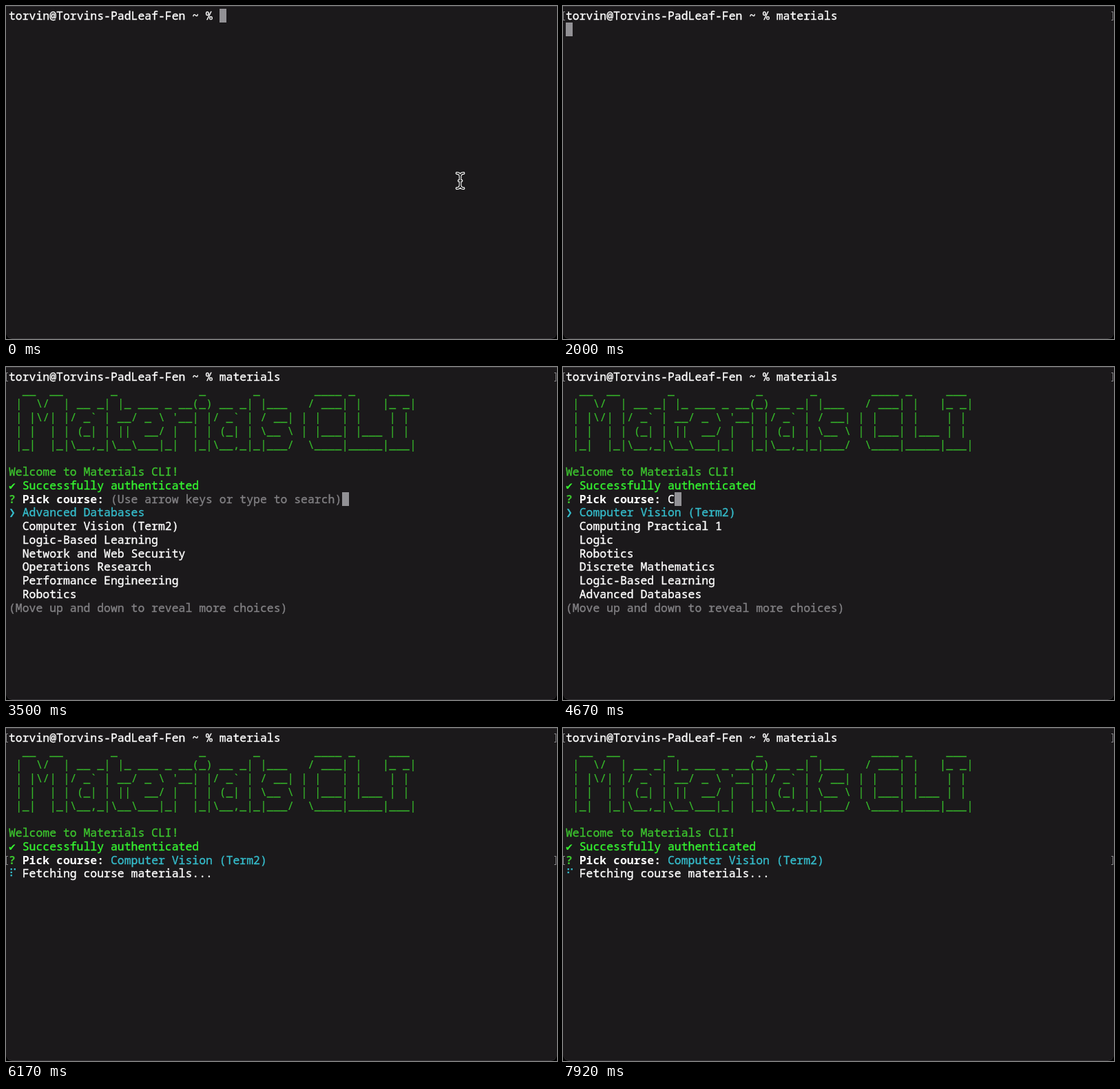
Animation, 800 px wide and 484 px high, one loop 8000 ms. Source, as an HTML page:

```html
<!DOCTYPE html>
<html lang="en">
<head>
<meta charset="utf-8">
<title>Materials CLI</title>
<style>
  html, body { margin: 0; width: 100%; height: 100%; overflow: hidden; background: #000; }
  #term {
    position: relative; width: 800px; height: 484px; overflow: hidden;
    box-sizing: border-box; background: #1b191b; border-radius: 0 0 9px 9px;
    font: 500 16.45px/19.76px "Noto Sans Mono", "DejaVu Sans Mono", monospace;
    font-variant-ligatures: none; color: #fff; white-space: pre;
    -webkit-text-stroke: .35px currentColor;
  }
  #edge {
    position: absolute; inset: 0; border: solid #343235; border-width: 1px 0;
    border-radius: 0 0 9px 9px;
  }
  .row, #banner { position: absolute; left: 4px; margin: 0; font: inherit; }
  #banner { top: 23.56px; color: #37b92b; -webkit-text-stroke-width: .15px; }
  #cursor { position: absolute; width: 10px; height: 20px; background: #929195; }
  .mark {
    position: absolute; width: 3px; height: 13px; box-sizing: border-box;
    border: 1px solid #858487;
  }
  .mark.l { left: 0; border-right: 0; }
  .mark.r { right: 1px; border-left: 0; }
  .sym {
    display: inline-block; width: .6em; line-height: 0;
    font-family: "DejaVu Sans Mono", "DejaVu Sans", monospace;
    -webkit-text-stroke-width: 0;
  }
  .green { color: #3cc42e; }
  .bright { color: #35f430; }
  .cyan { color: #35bccb; }
  .gray { color: #828184; }
  b { font-weight: 700; -webkit-text-stroke-width: 0; }
  svg { position: absolute; left: 0; top: 0; fill: none; stroke-linecap: round; }
</style>
</head>
<body>
<div id="term"><div id="edge"></div><div id="cursor"></div><pre id="banner">
  __  __       _            _       _        ____ _     ___ 
 |  \/  | __ _| |_ ___ _ __(_) __ _| |___   / ___| |   |_ _|
 | |\/| |/ _` | __/ _ \ '__| |/ _` | / __| | |   | |    | | 
 | |  | | (_| | ||  __/ |  | | (_| | \__ \ | |___| |___ | | 
 |_|  |_|\__,_|\__\___|_|  |_|\__,_|_|___/  \____|_____|___|</pre><div id="text"></div><svg id="beam" width="800" height="484"><defs><path id="ibeam" d="M654.5 243Q659.5 243 659.5 248V260Q659.5 265 654.5 265M664.5 243Q659.5 243 659.5 248M659.5 260Q659.5 265 664.5 265M657.5 254H661.5"/></defs><use href="#ibeam" stroke="#fff" stroke-width="3.8"/><use href="#ibeam" stroke="#111" stroke-width="1.5"/></svg></div>
<script>
const LOOP = 8000, TICK = 1000 / 12, CELL = 9.87, LINE = 19.76;
const PROMPT = 'torvin@Torvins-PadLeaf-Fen ~ % ';
const COMMAND = 'materials';
const KEYS = [670, 750, 920, 1000, 1170, 1250, 1500, 1580, 1670];
const QUERY = 'Comp';
const QUERY_KEYS = [4500, 4750, 4920, 5080];
const RUN = 2000, BANNER = 2500, SIGNED_IN = 3250, LIST = 3330, PICK = 5330, FETCH = 5417;
const SPIN = '⠋⠙⠹⠸⠼⠴⠦⠧⠇⠏';

const vision = 'Computer Vision (Term2)', practical = 'Computing Practical 1';
const matches = [vision, practical, 'Operations Research'];
const choices = [
  ['Advanced Databases', vision, 'Logic-Based Learning', 'Network and Web Security',
    'Operations Research', 'Performance Engineering', 'Robotics'],
  [vision, practical, 'Logic', 'Robotics', 'Discrete Mathematics',
    'Logic-Based Learning', 'Advanced Databases'],
  [vision, practical, 'Logic', 'Robotics', 'Operations Research',
    'Discrete Mathematics', 'Logic-Based Learning'],
  matches, matches
];

const el = id => document.getElementById(id);
const span = (cls, s) => `<span class="${cls}">${s}</span>`;
const sym = (cls, s) => span('sym ' + cls, s);
const pressed = (keys, t) => keys.filter(k => t >= k).length;

function spinner(t, start, label) {
  const i = Math.floor((t - start + 4) / TICK) % SPIN.length;
  return sym('cyan', SPIN[i]) + ' ' + label;
}

// Returns the text rows, the cursor cell and the rows with prompt marks.
function screen(t) {
  const rows = [], marks = [];
  const typed = pressed(KEYS, t);
  let cursor = [PROMPT.length + typed, 0];
  rows[0] = PROMPT + COMMAND.slice(0, typed);
  if (t >= RUN) {
    marks.push(0);
    cursor = [0, 1];
  }
  if (t >= BANNER) {
    rows[7] = span('green', 'Welcome to Materials CLI!');
    rows[8] = spinner(t, BANNER, 'Authenticating...');
    cursor = null;
  }
  if (t >= SIGNED_IN) {
    rows[8] = sym('bright', '✔') + span('bright', ' Successfully authenticated');
    cursor = [0, 9];
  }
  if (t >= LIST) {
    const ask = '<b>' + span('green', '?') + ' Pick course:</b> ';
    if (t >= PICK) marks.push(9);
    if (t >= FETCH) {
      rows[9] = ask + span('cyan', vision);
      rows[10] = spinner(t, FETCH, 'Fetching course materials...');
      cursor = null;
    } else {
      const n = pressed(QUERY_KEYS, t);
      const hint = '(Use arrow keys or type to search)';
      rows[9] = ask + (n ? QUERY.slice(0, n) : span('gray', hint));
      cursor = [15 + (n || hint.length), 9];
      choices[n].forEach((name, i) => {
        rows[10 + i] = i ? '  ' + name : sym('cyan', '❯') + span('cyan', ' ' + name);
      });
      if (choices[n].length > 6) {
        rows[17] = span('gray', '(Move up and down to reveal more choices)');
      }
    }
  }
  return { rows, cursor, marks };
}

let shown = '';
function draw(t) {
  const { rows, cursor, marks } = screen(t);
  let html = '';
  rows.forEach((s, i) => {
    html += `<div class="row" style="top:${(3.8 + i * LINE).toFixed(2)}px">${s}</div>`;
  });
  for (const m of marks) {
    const top = Math.round(8 + m * LINE);
    for (const side of 'lr') html += `<div class="mark ${side}" style="top:${top}px"></div>`;
  }
  if (html !== shown) el('text').innerHTML = shown = html;

  el('banner').hidden = t < BANNER;
  el('beam').style.display = t < KEYS[0] ? '' : 'none';
  const block = el('cursor');
  block.hidden = !cursor;
  if (cursor) {
    block.style.left = Math.round(4 + cursor[0] * CELL) + 'px';
    block.style.top = Math.round(4.2 + cursor[1] * LINE) + 'px';
  }
}

const begin = performance.now();
function loop() {
  draw((performance.now() - begin) % LOOP);
  requestAnimationFrame(loop);
}
loop();
</script>
</body>
</html>
```
